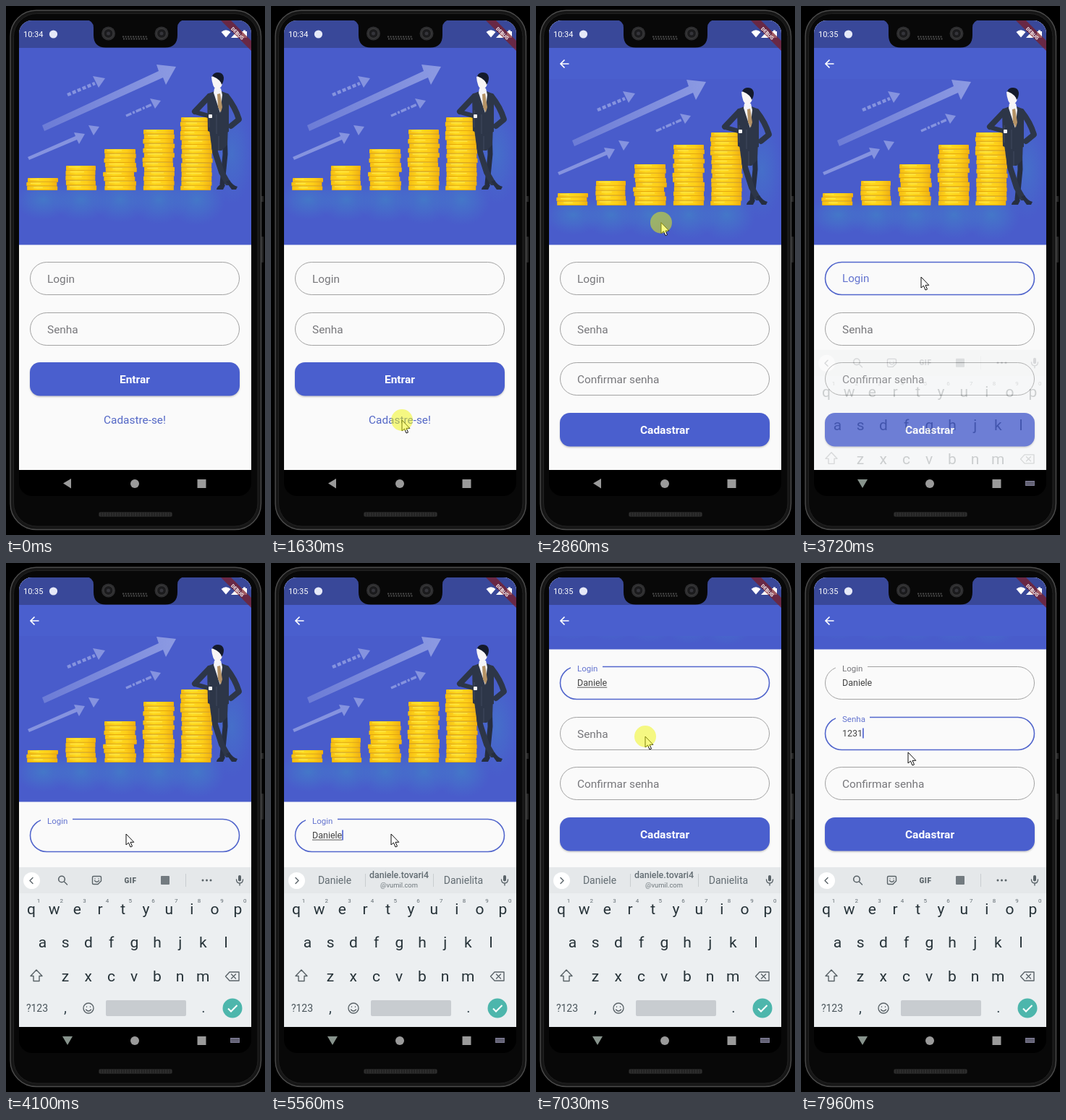
An HTML page that plays this animation: 358x732 px, repeating every 8000 ms.

```html
<!DOCTYPE html>
<html lang="pt-BR">
<head>
<meta charset="utf-8">
<title>Cadastro</title>
<style>
  html, body { margin: 0; width: 100%; height: 100%; overflow: hidden; background: #000; }
  svg { display: block; width: 358px; height: 732px; }
  text { font-family: Roboto, sans-serif; white-space: pre; }
  .mid { text-anchor: middle; }
  .line { fill: none; stroke: #5a6368; stroke-width: 1.4; stroke-linecap: round; stroke-linejoin: round; }
</style>
</head>
<body>
<script>
const LOOP = 8000, STEP = 76.67;
const BLUE = '#4a5fce', PAPER = '#fafafa';

// ---------- markup helpers ----------
const rect = (x, y, w, h, fill, more = '') =>
  `<rect x="${x}" y="${y}" width="${w}" height="${h}" fill="${fill}" ${more}/>`;
const circle = (x, y, r, fill, more = '') => `<circle cx="${x}" cy="${y}" r="${r}" fill="${fill}" ${more}/>`;
const path = (d, fill, more = '') => `<path d="${d}" fill="${fill}" ${more}/>`;
const stroke = (d, color, width, more = '') => path(d, 'none', `stroke="${color}" stroke-width="${width}" ${more}`);
const line = (d, more = '') => `<path class="line" d="${d}" ${more}/>`;
const text = (x, y, size, fill, str, more = '') =>
  `<text x="${x}" y="${y}" font-size="${size}" fill="${fill}" ${more}>${str}</text>`;
const mid = (x, y, size, fill, str, more = '') => text(x, y, size, fill, str, 'class="mid" ' + more);

function random(seed) {
  return () => (seed = (seed * 16807) % 2147483647) / 2147483647;
}

// ---------- illustration ----------
function coinStack([x, w, top]) {
  const rnd = random(x * 91 + 7), count = Math.round((255 - top) / 6.3), h = (255 - top) / count;
  let out = '';
  for (let i = 0; i < count; i++) {
    const y = top + i * h, dx = x + (i ? rnd() * 4 - 2 : 0);
    out += rect(dx, y, w - 1, h, 'url(#gold)', 'rx="1"') +
      rect(dx + .5, y + h - 1, w - 2, .9, '#e3a310') +
      rect(dx + 3 + rnd() * 8, y + 1.2, 12 + rnd() * 10, 1.2, '#ffe748');
  }
  return out;
}

function man() {
  const suit = '#2d3648', dark = '#262e40', skin = '#f8f5f6';
  const limb = 'stroke-linejoin="round" stroke-linecap="round"';
  return stroke('M281 125L261 146', suit, 8, limb) + stroke('M262 147L280 152', suit, 6, limb) +
    stroke('M305 125Q317 140 322 157L311 166', suit, 8, limb) +
    stroke('M302 170L303 205L299 246', dark, 7, limb) + stroke('M286 170L289 202L298 230L306 244', suit, 8, limb) +
    path('M280 164H307L306 192L298 200H285Z', suit) +
    path('M291 254Q291 250 298 246L303 248L300 254ZM304 243L309 241Q313 248 320 250L318 254H312Z', dark) +
    path('M278 122L288 118H298L308 122L308 174L293 178L279 173Z', suit) +
    stroke('M281 144V168M291 150V177M294 180V200', '#465065', .8) +
    path('M288 114H297L299 123L296 148L287 120Z', '#f4f4f8') +
    path('M292 122L296 121L299 140L297 147L293 140Z', '#b59366') +
    path('M284 98Q290 94 298 100L299 108Q297 115 291 116Q285 112 284 98Z', skin) +
    path('M285 97Q287 92 293 92Q300 92 301 99Q301 105 298 109Q297 102 285 97Z', '#141a2c') +
    rect(280, 150, 5, 5, skin, 'rx="1"');
}

function art() {
  const pale = '#8593df';
  const stacks = [[30, 43, 238], [83, 42, 221], [136, 44, 198], [190, 43, 171], [242, 43, 154]];
  const glow = stacks.map(([x, w], i) =>
    `<ellipse cx="${x + w / 2}" cy="268" rx="40" ry="${28 + i * 2}" fill="url(#glow)"/>`).join('');
  return rect(18, 30, 321, 330, '#495ccb') + glow +
    '<ellipse cx="312" cy="205" rx="30" ry="70" fill="url(#glow)" opacity=".7"/>' +
    path('M50 165L211 90L208 81L235 84L221 109L217 99L53 173Z', 'url(#fade)') +
    path('M30 209L96 180L94 175L109 177L101 191L98 185L32 213Z', pale) +
    path('M114 165L129 167L121 179Z', pale) +
    stroke('M85 123L123 107', pale, 4.5, 'stroke-dasharray="5 2.5"') +
    path('M120 97L137 100L128 113Z', pale) +
    stroke('M166 152L202 136', pale, 3.5, 'stroke-dasharray="8 2 3 2"') +
    path('M199 128L214 131L206 142Z', pale) +
    stacks.map(coinStack).join('') + man();
}

// ---------- form parts ----------
const field = (id, y, label, gap) => `<g transform="translate(0 ${y})">
  <rect id="${id}Box" x="33.5" y=".5" width="289" height="45" rx="22.8" fill="none" stroke="#a2a2a2"/>
  <rect id="${id}Gap" x="48" y="-2" width="${gap}" height="6" fill="${PAPER}" visibility="hidden"/>
  <text id="${id}Label" font-size="15.4" fill="#77777b" transform="translate(57 29)">${label}</text>
  <text id="${id}Text" x="57" y="27" font-size="12.5" fill="#444"></text>
  <rect id="${id}Line" x="57" y="28.6" height="1" fill="#555"/>
  <rect id="${id}Caret" y="15.5" width="1.6" height="14" fill="${BLUE}"/></g>`;

const button = (y, label) => rect(33, y + 1.5, 290, 46.5, '#000', 'rx="14" opacity=".2" filter="url(#soft)"') +
  rect(33, y, 290, 46.5, BLUE, 'rx="14"') + mid(178, y + 29, 15.5, '#fff', label, 'font-weight="700"');

const loginPage = () => rect(18, 20, 321, 622, PAPER) + rect(18, 20, 321, 40, BLUE) +
  `<g clip-path="url(#tallImage)"><use href="#art"/></g>` +
  field('a', 354, 'Login', 44) + field('b', 424, 'Senha', 47) + button(493, 'Entrar') +
  mid(178, 578, 15.4, '#5468c6', 'Cadastre-se!');

const registerPage = () => `<g id="register">` + rect(18, 20, 321, 622, PAPER) +
  `<g clip-path="url(#body)"><g id="scroll">
    <g clip-path="url(#image)"><use href="#art" y="21"/></g>` +
  field('login', 354, 'Login', 44) + field('pass', 424, 'Senha', 47) +
  field('again', 493, 'Confirmar senha', 90) + button(563, 'Cadastrar') + `</g></g>` +
  rect(18, 20, 321, 81, BLUE) +
  stroke('M45.5 80H34.5M39.5 74.5L34 80L39.5 85.5', '#fff', 1.7) + `</g>`;

// ---------- keyboard ----------
function keyRow(keys, x, y) {
  return [...keys].map((k, i) => mid(x + i * 31.7, y, 21, '#263238', k)).join('');
}

function keyboard() {
  const grey = '#5a6368';
  const hints = [...'1234567890'].map((n, i) => mid(45 + i * 31.7, 470, 8, '#606a70', n)).join('');
  const icons = circle(77, 437.5, 4.3, 'none', `stroke="${grey}" stroke-width="1.6"`) + line('M80.5 441L84.5 445') +
    line('M121 433.5H130Q131.5 433.5 131.5 435V440L127 444.5H121Q119.5 444.5 119.5 443V435Q119.5 433.5 121 433.5M122.5 439.5Q125.5 443 128.5 439.5M123 437V437M128 437V437') +
    mid(172, 442.5, 10, grey, 'GIF', 'font-weight="800" letter-spacing=".6"') +
    rect(214, 433, 12, 12, '#737b80', 'rx="1"') + rect(248, 430, 1, 18, '#c9cdd0') +
    [272, 277.5, 283].map(x => circle(x, 439, 1.5, grey)).join('');
  const words = rect(130, 430, 1, 18, '#c9cdd0') + rect(224, 430, 1, 18, '#c9cdd0') +
    ['w0', 'w1', 'w2'].map((id, i) => mid([88, 177, 266][i], 444, 14, '#626c72', '', `id="${id}"`)).join('') +
    mid(177, 449, 9.4, '#6d767b', '', 'id="mail"');
  return `<g id="keyboard">` + rect(18, 421, 321, 221, '#eceff1') + rect(18, 421, 321, 36, '#e5e8ea') +
    circle(35.5, 439.5, 11.5, '#fff') + line('', 'id="chevron" stroke-width="1.8"') +
    `<g id="icons">${icons}</g><g id="words">${words}</g>` +
    rect(321, 432, 4, 8.5, grey, 'rx="2"') + line('M318.5 438Q318.5 443 323 443Q327.5 443 327.5 438M323 443V446') +
    hints + keyRow('qwertyuiop', 35, 486) + keyRow('asdfghjkl', 50.5, 532) + keyRow('zxcvbnm', 82, 579) +
    line('M42 563L50 571.5H46V578.5H38V571.5H34Z') +
    line('M309 566H322V578H309L303.5 572ZM311.5 569L317.5 575M317.5 569L311.5 575') +
    mid(43, 621, 14, '#4a555b', '?123') + mid(82, 622, 20, '#37474f', ',') + mid(273, 622, 20, '#37474f', '.') +
    circle(114, 616, 7, 'none', `stroke="${grey}" stroke-width="1.4"`) +
    line('M110.5 618Q114 622 117.5 618M111.5 614V614.2M116.5 614V614.2') +
    rect(138, 605, 111, 22, '#c8ccd0', 'rx="2"') + circle(313, 616, 13.5, '#4db6ac') +
    stroke('M307 616.5L311 620.5L319.5 612', '#fff', 2) + `</g>`;
}

// ---------- phone ----------
const phoneBack = () =>
  rect(353, 263, 3, 8, '#252525') + rect(353, 319, 3, 36, '#252525', 'rx="1"') +
  rect(6, 6, 346.5, 718.5, '#161616', 'rx="36" stroke="#4c4c4c" stroke-width="1.4"') +
  rect(10.5, 10.5, 337.5, 709.5, '#080808', 'rx="32" stroke="#222" stroke-width="1"') +
  rect(18, 20, 321, 658, '#000', 'rx="18"') +
  rect(128, 700, 102, 7, '#202020', 'rx="3"') +
  stroke('M129 703.5H229', '#2e2e2e', 5, 'stroke-dasharray="2 1.5"');

const lens = x => circle(x, 38, 9.5, '#2e2e30') + circle(x, 38, 6.5, '#1b1b1d', 'stroke="#444" stroke-width=".8"') +
  circle(x, 38, 2.5, '#34343a');

const phoneFront = () => rect(18, 20, 321, 38, '#20264a', 'opacity=".4"') +
  text(24, 43, 11, '#fff', '', 'id="clock"') + circle(65.5, 39, 5.6, '#e6e9f8') +
  path('M297.5 36Q304 30.5 310.5 36L304 43.5Z', '#fff') + path('M311 44L321 33.5V44Z', '#fff') +
  path('M326 35H328V33.5H331V35H333V44H326Z', '#fff') +
  path('M297 20H311L339 48V62Z', '#7c1d26', 'opacity=".72"') +
  mid(0, 2.4, 6.8, '#eee6ea', 'DEBUG', 'font-weight="800" transform="translate(320 38) rotate(45)"');

const notch = () => path('M110 19Q121 20 121 30V40Q121 57.5 138 57.5H220Q237 57.5 237 40V30Q237 20 248 19Z', '#080808') +
  lens(141.5) + lens(215) +
  stroke('M161 42.5H196M162 45.5H197', '#4a4a4a', 2, 'stroke-dasharray="2 1.5"');

const navBar = () => path('M79 660.5L90 654V667.5Z', '#9a9a9a', 'id="back"') +
  circle(178, 661, 6, '#9a9a9a') + rect(264.5, 655, 12, 12, '#9a9a9a') +
  `<g id="switch">` + rect(310, 657, 13, 7, '#77758c') +
  stroke('M311.5 659.5H322M311.5 661.5H322', '#111', .8, 'stroke-dasharray="1 1"') + `</g>`;

const stop = (at, color, alpha = 1) => `<stop offset="${at}" stop-color="${color}" stop-opacity="${alpha}"/>`;
const clip = (id, y, h, rx = 0) => `<clipPath id="${id}">${rect(18, y, 321, h, '#fff', `rx="${rx}"`)}</clipPath>`;

document.body.innerHTML = `<svg viewBox="0 0 358 732"><defs>
  <linearGradient id="gold">${stop(0, '#f6bd10')}${stop(.35, '#ffdb20')}${stop(.7, '#fdce18')}${stop(1, '#f0b010')}</linearGradient>
  <linearGradient id="fade">${stop(0, '#6c7cd6')}${stop(1, '#8c9ae2')}</linearGradient>
  <radialGradient id="glow">${stop(0, '#3f92c6', .5)}${stop(.5, '#418bc9', .28)}${stop(1, '#4380cc', 0)}</radialGradient>
  <filter id="soft"><feGaussianBlur stdDeviation="1.2"/></filter>
  ${clip('screen', 20, 680, 18)}${clip('pages', 20, 622)}${clip('body', 101, 541)}${clip('image', 101, 229.5)}${clip('tallImage', 58, 272.5)}
  <g id="art">${art()}</g></defs>
  ${phoneBack()}
  <g clip-path="url(#screen)"><g clip-path="url(#pages)">${loginPage()}${registerPage()}${keyboard()}</g>${phoneFront()}</g>
  ${notch()}${navBar()}
  <g id="pointer"><path d="M0 0V15L3.5 12L6 18L8.5 17L6 11.3H10.8Z" fill="#fff" stroke="#111" stroke-width="1"/>
  <circle id="press" r="15" fill="#f0f50a" opacity=".5"/></g></svg>`;

// ---------- timing ----------
const $ = id => document.getElementById(id);
const set = (id, attrs) => { for (const k in attrs) $(id).setAttribute(k, attrs[k]); };
const show = (id, on) => set(id, { visibility: on ? 'visible' : 'hidden' });
const clamp = v => Math.min(1, Math.max(0, v));
const within = (t, spans) => spans.some(([a, b]) => t >= a && t < b);
const latest = (keys, t) => keys.filter(k => k[0] <= t).pop();

function bezier(x1, y1, x2, y2) {
  const at = (a, b, u) => 3 * a * u * (1 - u) ** 2 + 3 * b * u * u * (1 - u) + u ** 3;
  return x => {
    let lo = 0, hi = 1;
    for (let i = 0; i < 20; i++) {
      const u = (lo + hi) / 2;
      if (at(x1, x2, u) < x) lo = u; else hi = u;
    }
    return at(y1, y2, lo);
  };
}
const slideEase = bezier(.4, 0, .2, 1), fadeEase = bezier(.42, 0, 1, 1);

function track(keys, t) {
  const i = keys.findIndex(k => k[0] > t);
  if (i === 0) return keys[0].slice(1);
  if (i < 0) return keys[keys.length - 1].slice(1);
  const a = keys[i - 1], b = keys[i], p = (t - a[0]) / (b[0] - a[0]);
  return a.slice(1).map((v, n) => v + (b[n + 1] - v) * p);
}

// The picture advances in steps that restart at each burst of activity.
const BURSTS = [0, 380, 1240, 1480, 1630, 2480, 3320, 3720, 4100, 4560, 4870, 5180, 5330, 5560, 6020, 6190, 7030, 7650, 7800];
function snap(t) {
  const from = BURSTS.filter(b => b <= t).pop();
  return from + Math.floor((t - from) / STEP + .1) * STEP;
}

const POINTER = [
  [380, 269, 659], [760, 212, 598], [920, 178, 560], [1070, 204, 584], [1240, 192, 579], [1310, 181, 573],
  [1860, 181, 573], [2100, 180, 490], [2400, 177, 405], [2560, 177, 404], [2860, 173, 299], [3250, 166, 375],
  [6190, 166, 375], [6270, 172, 330], [6420, 186, 150], [6500, 187, 132], [6960, 151, 240],
  [7790, 151, 240], [7950, 148, 262]];
const PRESSES = [[1480, 1640], [2550, 2930], [3320, 3550], [6190, 6490], [7030, 7180]];
const SCROLL = [[6190, 0], [6270, 22], [6340, 100], [6420, 182], [6500, 211]];
const NAME = 'Daniele';
const NAME_KEYS = [[0, 0], [4560, 1], [4870, 2], [5020, 3], [5180, 4], [5330, 5], [5400, 6], [5560, 7]];
const PASS_KEYS = [[0, 0], [7400, 1], [7650, 2], [7800, 3], [7950, 4]];
const HINTS = [[0, 'De', 'Dia'], [4870, 'Dar', 'Das'], [5020, 'Dança', 'Dando'], [5180, 'Daniela', 'Danilo'],
  [5560, 'daniele.tovari4', 'Danielita']];

function drawField(id, { focus, raise, value, caret, underline }) {
  set(id + 'Box', { stroke: focus ? '#5266cc' : '#a2a2a2', 'stroke-width': focus ? 1.6 : 1 });
  show(id + 'Gap', raise > .3);
  set(id + 'Label', {
    transform: `translate(57 ${29 - 22 * raise}) scale(${1 - .25 * raise})`,
    fill: focus ? '#6474cf' : '#77777b'
  });
  const label = $(id + 'Text');
  label.textContent = value;
  const width = value ? label.getComputedTextLength() : 0;
  set(id + 'Caret', { x: 57 + width });
  set(id + 'Line', { width });
  show(id + 'Caret', caret);
  show(id + 'Line', underline && value);
}

function render(now) {
  const t = snap(now);

  const enter = clamp((t - 1625) / 300);
  set('register', {
    opacity: enter ? fadeEase(enter) : 0,
    transform: `translate(0 ${155 * (1 - slideEase(enter))})`
  });
  set('scroll', { transform: `translate(0 ${-track(SCROLL, t)[0]})` });
  $('clock').textContent = t < 2930 ? '10:34' : '10:35';

  const onPass = t >= 7100;
  const name = NAME.slice(0, latest(NAME_KEYS, t)[1]);
  drawField('login', {
    focus: t >= 3700 && !onPass,
    raise: slideEase(clamp((t - 3690) / 200)),
    value: name,
    caret: within(t, [[3790, 4100], [4560, 6020]]),
    underline: !onPass
  });
  drawField('pass', {
    focus: onPass,
    raise: slideEase(clamp((t - 7090) / 200)),
    value: '1231'.slice(0, latest(PASS_KEYS, t)[1]),
    caret: t >= 7180
  });
  drawField('again', { raise: 0, value: '' });

  const rise = slideEase(clamp((t - 3650) / 290));
  set('keyboard', { opacity: rise, transform: `translate(0 ${70 * (1 - rise)})` });
  const typing = name && t < 7180;
  show('icons', !typing);
  show('words', typing);
  set('chevron', { d: typing ? 'M34 435.5L38 439.5L34 443.5' : 'M37 435.5L33 439.5L37 443.5' });
  const [since, second, third] = latest(HINTS, t);
  const full = since === 5560;
  [name, second, third].forEach((word, i) => $('w' + i).textContent = word);
  set('w1', { y: full ? 436 : 444, 'font-size': full ? 12.4 : 14, 'font-weight': full ? 500 : 400 });
  $('mail').textContent = full ? '@vumil.com' : '';

  const open = t >= 3720;
  set('back', { d: open ? 'M78 655H92L85 667Z' : 'M79 660.5L90 654V667.5Z', fill: open ? '#87938c' : '#9a9a9a' });
  show('switch', open);

  const [x, y] = track(POINTER, t);
  set('pointer', { transform: `translate(${x} ${y})`, opacity: t >= 380 ? 1 : 0 });
  show('press', within(t, PRESSES));
}

const start = performance.now();
function tick() {
  render((performance.now() - start) % LOOP);
  requestAnimationFrame(tick);
}
tick();
</script>
</body>
</html>
```
